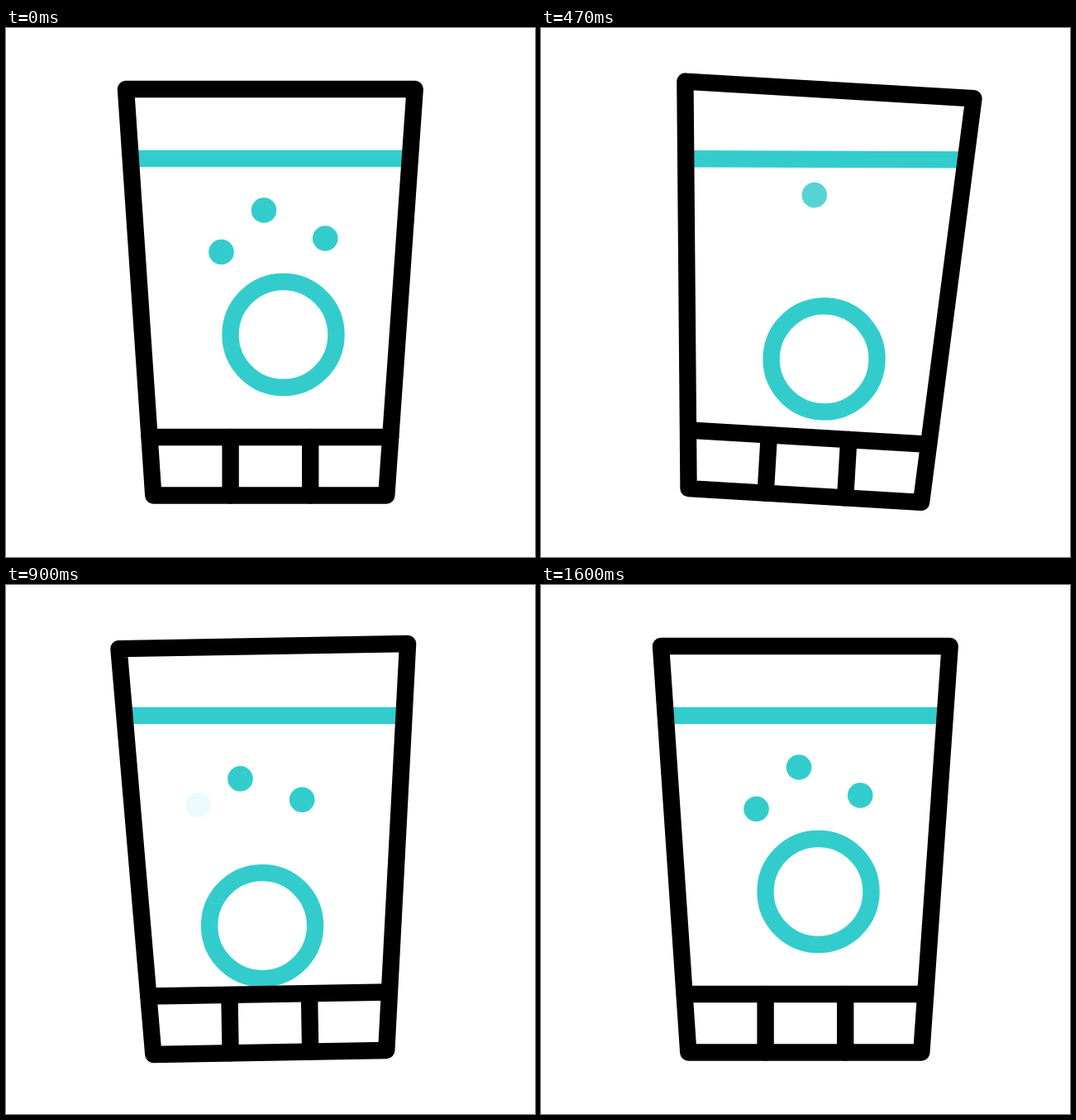
An HTML page with a canvas for the animation above (1670 ms loop, 640 by 640 pixels).

```html
<!DOCTYPE html>
<html>
<head>
<meta charset="utf-8">
<style>
html, body { margin: 0; height: 100%; overflow: hidden; background: #fff; }
canvas { display: block; }
</style>
</head>
<body>
<canvas id="stage" width="640" height="640"></canvas>
<script>
const ctx = document.getElementById('stage').getContext('2d');
const LOOP = 1670, STEP = 1000 / 30, LAST_STEP = 48;
const TEAL = '#33cccc';

// Heights above the tablet; time is the number of steps between two of them.
const bubbles = [
  { x: -75, low: 56, rest: 100, top: 149, time: 7.9 },
  { x: -23.5, low: 97, rest: 150.5, top: 208, time: 16 },
  { x: 50.7, low: 80, rest: 116.5, top: 175.5, time: 13 }
];

const clamp = v => Math.max(0, Math.min(1, v));
const ramp = (from, to, n) => clamp((n - from) / (to - from));
const smooth = (from, to, n) => {
  const u = ramp(from, to, n);
  return u * u * (3 - 2 * u);
};

function rotateAbout(x, y, degrees) {
  ctx.translate(x, y);
  ctx.rotate(degrees * Math.PI / 180);
  ctx.translate(-x, -y);
}

function circle(x, y, r) {
  ctx.beginPath();
  ctx.arc(x, y, r, 0, 2 * Math.PI);
}

function line(x0, y0, x1, y1) {
  ctx.beginPath();
  ctx.moveTo(x0, y0);
  ctx.lineTo(x1, y1);
  ctx.stroke();
}

function drawWater(tilt) {
  ctx.save();
  rotateAbout(320, 158, tilt);
  ctx.lineCap = 'butt';
  line(151, 158, 489, 158);
  ctx.restore();
}

// Opacity follows height: in from low to halfway up, out just below top.
function drawBubble({ x, low, rest, top }, tabletX, tabletY, appear, leave) {
  const height = low + (rest - low) * appear + (top - rest) * leave;
  ctx.globalAlpha = clamp(2 * appear) * clamp((top - height) / 13);
  circle(tabletX + x, tabletY - height, 15.3);
  ctx.fill();
  ctx.globalAlpha = 1;
}

function drawTablet(x, y, n) {
  for (const bubble of bubbles) {
    const { time } = bubble;
    drawBubble(bubble, x, y, 1, ramp(1, 1 + time, n));
    drawBubble(bubble, x, y, ramp(15, 19.3, n), ramp(19.3, 19.3 + time, n));
    drawBubble(bubble, x, y, ramp(30, 30 + time, n), 0);
  }
  circle(x, y, 64);
  ctx.stroke();
}

function drawGlass() {
  ctx.beginPath();
  ctx.moveTo(145, 74);
  ctx.lineTo(494.7, 74);
  ctx.lineTo(460.3, 565.5);
  ctx.lineTo(178.3, 565.5);
  ctx.closePath();
  ctx.stroke();
  line(173.7, 495, 465.2, 495);
  for (const x of [271.6, 368.2]) line(x, 495, x, 565.5);
}

function draw(now) {
  const n = Math.min(LAST_STEP, Math.floor((now % LOOP + 4) / STEP));
  const lean = ramp(1, 13.1, n), swing = ramp(13.1, 22, n);
  const back = ramp(23, 31, n), settle = ramp(32, 37.6, n);
  const sink = smooth(5.5, 19, n) - smooth(31, 41, n);

  ctx.clearRect(0, 0, 640, 640);
  ctx.save();
  rotateAbout(319, 565.5, 4 * lean - 6 * swing + 2 * back);
  ctx.lineWidth = 20.4;
  ctx.lineCap = ctx.lineJoin = 'round';
  ctx.strokeStyle = ctx.fillStyle = TEAL;
  drawWater(-4 * lean + 8 * swing - 6 * back + 2 * settle);
  drawTablet(335.5 - 27 * swing + 8.5 * back + 18.5 * settle, 371 + 41 * sink, n);
  ctx.strokeStyle = '#000';
  drawGlass();
  ctx.restore();
}

const start = performance.now();
function tick() {
  draw(performance.now() - start);
  requestAnimationFrame(tick);
}
tick();
</script>
</body>
</html>
```
